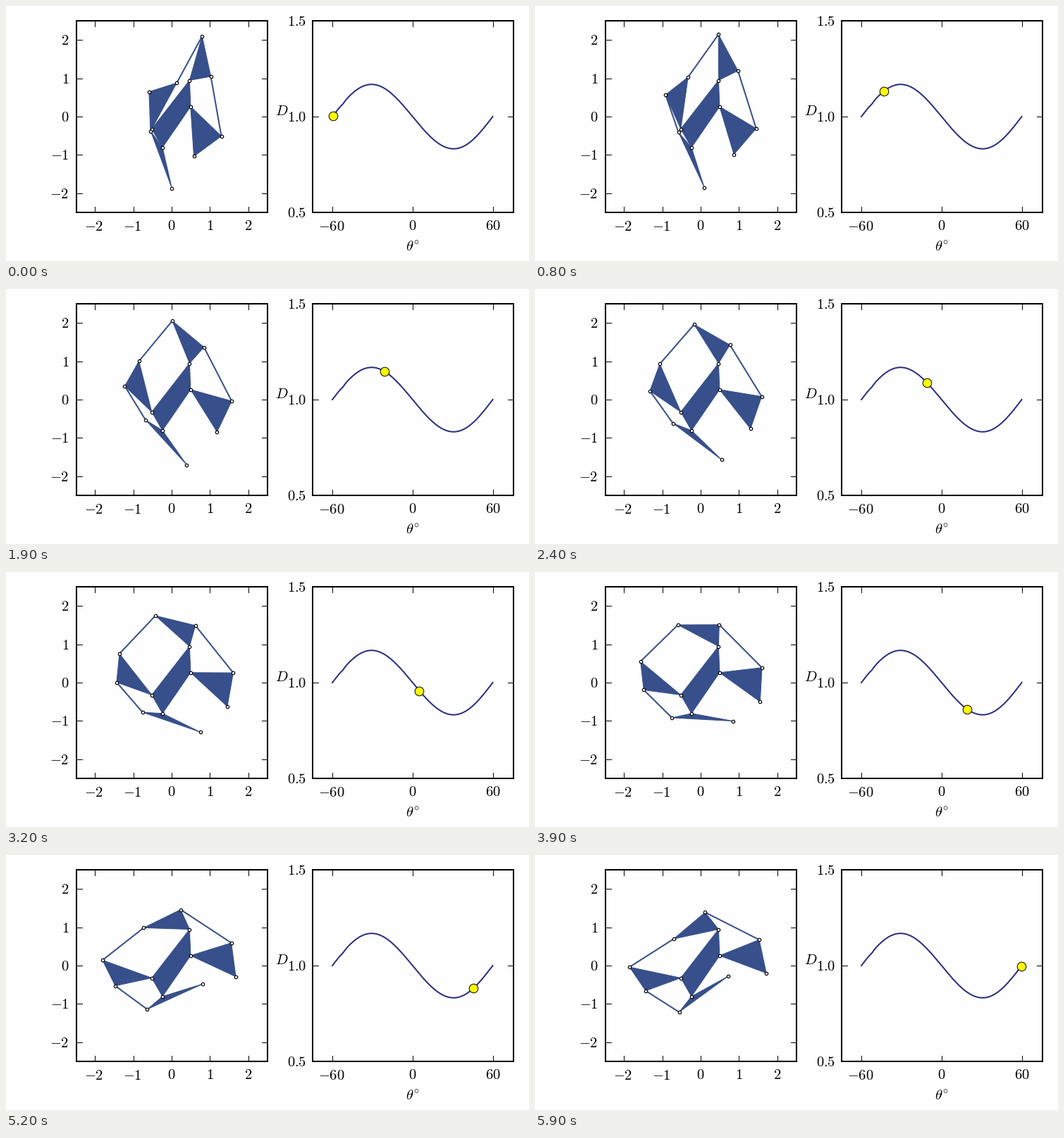
These frames come from a looping animation (742x362 px, 6000 ms). A matplotlib script:

```python
import numpy as np
import matplotlib.pyplot as plt
from matplotlib.animation import FuncAnimation
from matplotlib.patches import Polygon, Rectangle

W, H, DPI = 742, 362, 100
PX = 72 / DPI  # points per pixel
FRAMES, INTERVAL = 60, 100

PAPER, BLUE, CURVE, YELLOW = "#fdfefd", "#374f8a", "#2b2d80", "#ffff00"

# Fixed pivots, in pixels
A, B = np.array([260.4, 105.5]), np.array([261.9, 142.8])
C, D = np.array([222, 200.8]), np.array([206.8, 174.5])

plt.rcParams["mathtext.fontset"] = "cm"
fig = plt.figure(figsize=(W / DPI, H / DPI), dpi=DPI, facecolor=PAPER)
ax = fig.add_axes([0, 0, 1, 1])
ax.set_xlim(0, W)
ax.set_ylim(H, 0)
ax.axis("off")


def label(x, y, text, ha="center"):
    ax.text(x, y, f"${text}$", fontsize=20.6 * PX, ha=ha, va="baseline")


def tick(xs, ys):
    ax.plot(xs, ys, color="black", lw=1 * PX, zorder=1)


def frame_box(x0, x1, xticks, yticks, pad, y0=21, y1=293, size=8):
    ax.add_patch(Rectangle((x0, y0), x1 - x0, y1 - y0, fill=False,
                           ec="black", lw=2 * PX, zorder=6))
    for x, value in xticks:
        tick([x, x], [y0, y0 + size])
        tick([x, x], [y1 - size, y1])
        minus = value < 0  # signed labels hang a little left and low
        label(x - 1.5 * minus, 318 + minus, value)
    for y, text in yticks:
        if y0 < y < y1:
            tick([x0, x0 + size], [y, y])
            tick([x1 - size, x1], [y, y])
        label(x0 - pad, y + 7, text, ha="right")


def graph_x(deg):
    return 576.8 + 1.896 * deg


def distance(deg):
    t = np.radians(3 * deg)
    dip = 0.004 * np.exp(-((deg + 52.3) / 1.8) ** 2)
    return 1 - 0.168 * (np.sin(t) - 0.018 * np.sin(2 * t)) - dip


def graph_y(deg):
    return 157 - 272 * (distance(deg) - 1)


def polar(origin, length, deg):
    t = np.radians(deg)
    return origin + length * np.array([np.cos(t), -np.sin(t)])


def joint_angle(pivot, arm, target, rod, side):
    """Direction of an arm whose tip is tied to target by a rod."""
    dx, dy = target - pivot
    d = np.hypot(dx, dy)
    cos = (d * d + arm * arm - rod * rod) / (2 * d * arm)
    bend = np.degrees(np.arccos(np.clip(cos, -1, 1)))
    return np.degrees(np.arctan2(-dy, dx)) + side * bend


def pose(i):
    crank = 74.1 + 2 * i
    top = polar(A, 65.1, crank)
    inner = polar(A, 30.7, crank - 63.8)

    right = joint_angle(B, 60.5, inner, 86, -1)
    elbow = polar(B, 60.5, right)
    hand = polar(B, 70.8, right - 42.4)

    left = joint_angle(D, 74.3, top, 74.3, 1)
    shoulder = polar(D, 74.3, left)
    outer = polar(D, 53, left + 32.1)

    low = joint_angle(C, 28.3, outer, 56.3, 1)
    heel = polar(C, 28.3, low)
    toe = polar(C, 59.7, low + 157.1)

    plates = [(A, top, inner), (B, elbow, hand),
              (D, shoulder, outer), (C, heel, toe)]
    rods = [(inner, elbow), (shoulder, top), (outer, heel)]
    return plates, rods


frame_box(99.5, 371,
          [(235 + 54.3 * v, v) for v in range(-2, 3)],
          [(157 - 54.4 * v, v) for v in range(-2, 3)], pad=10)
frame_box(434.5, 720,
          [(graph_x(v), v) for v in (-60, 0, 60)],
          [(21, "1.5"), (157, "1.0"), (293, "0.5")], pad=8)
label(391.5, 155, "D")
label(577, 348.5, r"\theta^{\circ}")

theta = np.linspace(-60, 60, 481)
ax.plot(graph_x(theta), graph_y(theta), color=CURVE, lw=2 * PX, zorder=2)
dot, = ax.plot([], [], "o", ms=12.6 * PX, mfc=YELLOW, mec="black",
               mew=1 * PX, zorder=7)


def plate(points):
    shape = Polygon(points, closed=True, fc=BLUE, ec=BLUE, lw=1 * PX, zorder=3)
    return ax.add_patch(shape)


plate([A, B, C, D])
start_plates, start_rods = pose(0)
plate_art = [plate(p) for p in start_plates]
rod_art = [ax.plot([], [], color=BLUE, lw=2 * PX, zorder=3)[0]
           for _ in start_rods]
pins, = ax.plot([], [], "o", ms=4.4 * PX, mfc="white", mec="black",
                mew=1.2 * PX, zorder=4)


def draw(i):
    plates, rods = pose(i)
    for art, points in zip(plate_art, plates):
        art.set_xy(points)
    for art, ends in zip(rod_art, rods):
        art.set_data(*np.transpose(ends))
    pins.set_data(*np.concatenate(plates).T)
    deg = -59.4 + 2.015 * i
    dot.set_data([graph_x(deg)], [graph_y(deg)])
    return [*plate_art, *rod_art, pins, dot]


anim = FuncAnimation(fig, draw, frames=FRAMES, interval=INTERVAL,
                     repeat=True, repeat_delay=0, blit=False)
plt.show()
```
